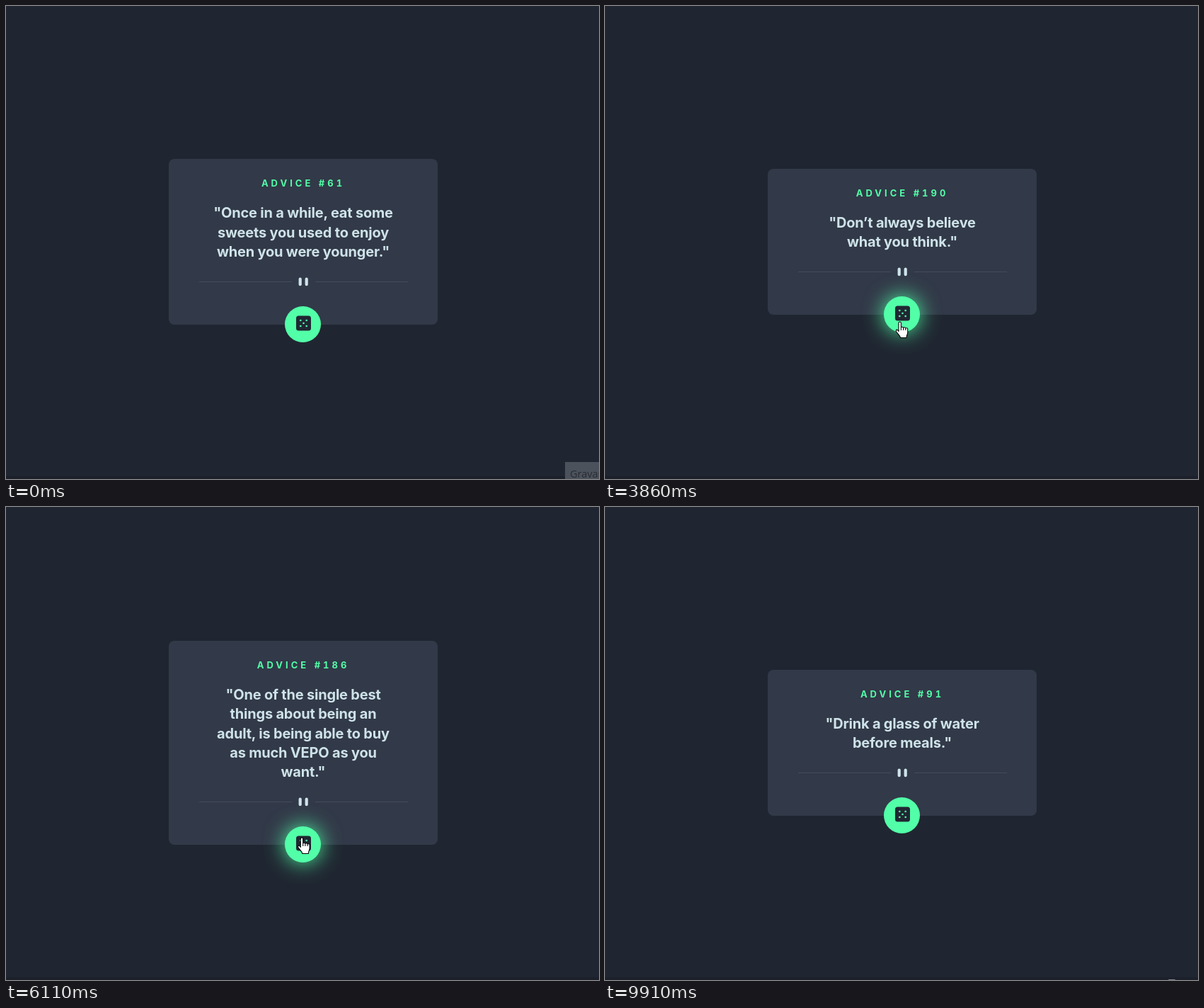
Recreate the animation shown at these times as an HTML page. Size 838 by 668 pixels, loop 9980 ms.

```html
<!DOCTYPE html>
<html lang="en">
<head>
<meta charset="utf-8">
<title>Advice generator</title>
<style>
  html, body { margin: 0; width: 100%; height: 100%; overflow: hidden; background: #202631; }
  body { position: relative; font-family: Inter, sans-serif; }
  body > *, #card > * { position: absolute; }
  #card { left: 230px; width: 380px; border-radius: 8px; background: #323948; text-align: center; }
  #title { top: 25px; width: 100%; color: #52ffa8; font: 700 13px/18px Inter, sans-serif;
    letter-spacing: 4px; font-variant-numeric: tabular-nums; }
  #quote { top: 63px; width: 100%; color: #cee3e9; font-size: 20px; font-weight: 700;
    line-height: 27.3px; letter-spacing: -.2px; white-space: pre; }
  #divider { left: 43px; bottom: 53px; }
  #button { left: 164px; bottom: -25.5px; width: 51px; height: 51px; border-radius: 50%; background: #52ffa8; }
  #button.hover { box-shadow: 0 0 30px #52ffa8; }
  #floor { left: 0; right: 0; bottom: 0; height: 4px; background: #1b202b; }
  #tooltip { left: 790px; top: 644px; width: 48px; height: 24px; overflow: hidden; box-sizing: border-box;
    padding-left: 7px; background: #4c525b; color: #282c34; font: 14.5px/34px "Open Sans", sans-serif; }
  #edge { left: 796px; top: 667px; width: 10px; height: 1px; border-radius: 5px 5px 0 0; background: #7d838b; }
  #pointer { left: 0; top: 0; overflow: visible; }
</style>
</head>
<body>
<div id="card">
  <div id="title"></div>
  <div id="quote"></div>
  <svg id="divider" width="295" height="16">
    <path d="M0 8.5H131M164 8.5H295" stroke="#424d5c"/>
    <path d="M142.7 4.6v7.6M151.7 4.6v7.6" stroke="#cee3e9" stroke-width="4.2" stroke-linecap="round"/>
  </svg>
  <svg id="button" viewBox="0 0 51 51">
    <rect x="16" y="13.5" width="21" height="21" rx="3.5" fill="#202733"/>
    <path d="M22.300 20h0m8.400 0h0m-4.200 4h0m-4.200 4h0m8.400 0h0" stroke="#52ffa8" stroke-width="2.700" stroke-linecap="round"/>
  </svg>
</div>
<div id="floor"></div>
<div id="tooltip">Gravar</div>
<div id="edge"></div>
<svg id="pointer" width="1" height="1">
  <g fill="#fff" stroke="#000" stroke-width="1.1" stroke-linejoin="round">
    <path id="arrow" d="M0 0V17L4 13 6.6 19 9.3 18 6.7 12H12Z"/>
    <path id="hand" d="M-1.7 13.5V1.7a1.7 1.7 0 0 1 3.4 0V8q1.6-1.6 3.2 .5q1.6-1.6 3.2 .5q3-1 3 1.500V15c0 2.600-1.700 4-1.800 7.500H.8C.6 20-3 17-5 14Q-6 10-3.200 11.600ZM1.700 8v4m3.200-3.500v3.500m3.200-3v3"/>
  </g>
  <circle id="click" r="14.5" fill="#ff0" fill-opacity=".47"/>
</svg>
<script>
const LOOP = 9980, STEP = 66, CLICK = 170;
const CENTRE_X = 419.5, CENTRE_Y = 332.9, REACH = 25.5;
const $ = id => document.getElementById(id);
const show = (id, on) => { $(id).style.display = on ? '' : 'none'; };
const latest = (list, t) => list.findLast(item => t >= item.at) || list[0];

// each card appears shortly after its click
const cards = [
  { at: 0, number: 61, text: '"Once in a while, eat some\nsweets you used to enjoy\nwhen you were younger."' },
  { click: 1740, at: 2490, number: 190, text: '"Don’t always believe\nwhat you think."' },
  { click: 4060, at: 4480, number: 130,
    text: '"If you have grandparents\nor parents - Talk to them\nmore. Ask them about\ntheir life experiences."' },
  { click: 5740, at: 6110, number: 186,
    text: '"One of the single best\nthings about being an\nadult, is being able to buy\nas much VEPO as you\nwant."' },
  { click: 8230, at: 8580, number: 91, text: '"Drink a glass of water\nbefore meals."' }
];
for (const card of cards) card.height = 151.4 + 27.3 * card.text.split('\n').length;

// every move starts where the one before it ended
const moves = [
  { at: 390, steps: 15, ease: 2, via: [[416, 451]] },
  { at: 3860, steps: 3, ease: 1, via: [[418, 436]] },
  { at: 4860, steps: 7, ease: 2, via: [[410, 469]] },
  { at: 5410, steps: 5, ease: 1, via: [[418, 467]] },
  { at: 6480, steps: 24, ease: 1, via: [[670, 395], [450, 151], [88, 350], [220, 500], [421, 486]] },
  { at: 8780, steps: 2, ease: 1, via: [[546, 588]] }
];
let from = [845, 615];
for (const move of moves) {
  move.path = [from, ...move.via];
  from = move.path.at(-1);
}

// Catmull-Rom curve through the points, u from 0 to 1
function along(points, u) {
  const last = points.length - 1;
  const i = Math.min(last - 1, Math.floor(u * last)), f = u * last - i;
  if (last === 1) return points[0].map((v, k) => v + (points[1][k] - v) * u);
  const at = n => points[Math.max(0, Math.min(last, n))];
  return [0, 1].map(k => {
    const [a, b, c, d] = [-1, 0, 1, 2].map(n => at(i + n)[k]);
    return b + f / 2 * (c - a + f * (2 * a - 5 * b + 4 * c - d + f * (3 * (b - c) + d - a)));
  });
}

// the hover state is only refreshed when the pointer moves
function pointerAt(t) {
  const { at, steps, ease, path } = latest(moves, t);
  const step = Math.max(0, Math.min(steps, Math.floor((t - at) / STEP) + 1));
  const [x, y] = along(path, 1 - (1 - step / steps) ** ease);
  const buttonY = CENTRE_Y + latest(cards, at + (step - 1) * STEP).height / 2;
  return { x, y, hover: Math.hypot(x - CENTRE_X, y - buttonY) < REACH };
}

let shown;
function showCard(card) {
  if (card === shown) return;
  shown = card;
  $('card').style.height = card.height + 'px';
  $('card').style.top = CENTRE_Y - card.height / 2 + 'px';
  $('title').textContent = 'ADVICE #' + card.number;
  $('quote').textContent = card.text;
}

function draw() {
  const t = performance.now() % LOOP;
  const { x, y, hover } = pointerAt(t);
  showCard(latest(cards, t));
  $('button').classList.toggle('hover', hover);
  $('pointer').style.transform = `translate(${x}px, ${y}px)`;
  show('pointer', t >= 390 && t < 8910);
  show('hand', hover);
  show('arrow', !hover);
  show('click', cards.some(({ click }) => t >= click && t < click + CLICK));
  show('tooltip', t < 70);
  show('edge', t >= 9910);
  requestAnimationFrame(draw);
}
draw();
</script>
</body>
</html>
```
